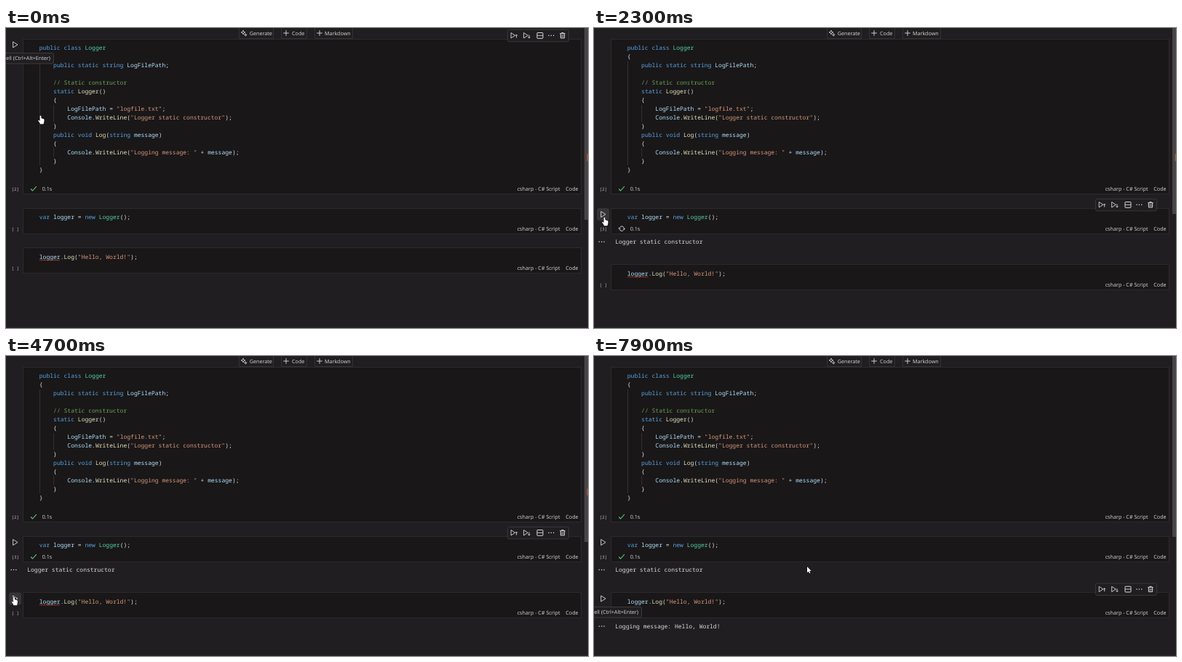
Recreate the animation shown at these times as an HTML page with a canvas. Size 800 px wide and 413 px high, loop 8 s.

```html
<!DOCTYPE html>
<html lang="en">
<head>
<meta charset="utf-8">
<title>Notebook run</title>
<style>
html, body { margin: 0; width: 100%; height: 100%; overflow: hidden; background: #201e20; }
canvas { display: block; width: 800px; height: 413px; }
</style>
</head>
<body>
<canvas id="stage"></canvas>
<script>
const W = 800, H = 413, LOOP = 8000, STEP = 100;
const CHAR = 4.82, LINE = 11.96, CODE_X = 45.8;
const MONO = '"Noto Sans Mono", "DejaVu Sans Mono", monospace';
const UI = '"Open Sans", "Noto Sans", sans-serif';
const COL = {
  page: '#201e20', cell: '#191718', edge: '#2c2a2c', text: '#dadada', dim: '#b4b4b4',
  key: '#5aa2e0', type: '#54d0a6', str: '#d8977c', note: '#6da058',
  name: '#b0e0fa', fn: '#e4e4bc', op: '#dedede', ok: '#5fc47e', err: '#c9483f'
};

const CLASS_CODE = [
  'public class Logger',
  '{',
  '    public static string LogFilePath;',
  '',
  '    // Static constructor',
  '    static Logger()',
  '    {',
  '        LogFilePath = "logfile.txt";',
  '        Console.WriteLine("Logger static constructor");',
  '    }',
  '    public void Log(string message)',
  '    {',
  '        Console.WriteLine("Logging message: " + message);',
  '    }',
  '}'
];

const canvas = document.getElementById('stage');
const dpr = window.devicePixelRatio || 1;
canvas.width = W * dpr;
canvas.height = H * dpr;
const ctx = canvas.getContext('2d');

function text(s, x, y, color = COL.text, size = 7.2, family = UI, align = 'left') {
  ctx.font = (family === MONO ? '500 ' : '') + size + 'px ' + family;
  ctx.textAlign = align;
  ctx.fillStyle = color;
  ctx.fillText(s, x, y);
}

function rect(x, y, w, h, fill, stroke, r = 0) {
  ctx.beginPath();
  ctx.roundRect(x, y, w, h, r);
  if (fill) { ctx.fillStyle = fill; ctx.fill(); }
  if (stroke) { ctx.strokeStyle = stroke; ctx.lineWidth = 1; ctx.stroke(); }
}

function line(points, color = COL.text, width = 0.9, close = false) {
  ctx.beginPath();
  points.forEach(([x, y], i) => i ? ctx.lineTo(x, y) : ctx.moveTo(x, y));
  if (close) ctx.closePath();
  ctx.strokeStyle = color;
  ctx.lineWidth = width;
  ctx.stroke();
}

function at(x, y, draw) {
  ctx.save();
  ctx.translate(x, y);
  draw();
  ctx.restore();
}

// Syntax colouring
const TOKEN = /(\/\/.*)|("[^"]*")|\b(public|class|static|string|void|var|new)\b|(\w+)(?=\()|(\w+)|([^\w\s"]+)/g;

function code(s, y) {
  let prev = '';
  for (const m of s.matchAll(TOKEN)) {
    const [word, note, str, key, fn, name] = m;
    let color = note ? COL.note : str ? COL.str : key ? COL.key : fn ? COL.fn : name ? COL.name : COL.op;
    if (prev === 'class' || prev === 'new') color = COL.type;
    text(word, CODE_X + m.index * CHAR, y, color, CHAR / 0.6, MONO);
    prev = word;
  }
}

// Icons
const play = (x, y, w = 6.4, h = 8) =>
  line([[x - w / 2, y - h / 2], [x + w / 2, y], [x - w / 2, y + h / 2]], COL.text, 0.9, true);

const check = (x, y) => line([[x - 3.8, y + 0.3], [x - 1.4, y + 2.8], [x + 3.8, y - 3]], COL.ok, 1.1);

const plus = (x, y) => {
  line([[x - 3.8, y], [x + 3.8, y]]);
  line([[x, y - 3.8], [x, y + 3.8]]);
};

function dots(x, y) {
  ctx.fillStyle = COL.text;
  for (const d of [-3.3, 0, 3.3]) ctx.fillRect(x + d - 0.6, y - 0.6, 1.3, 1.3);
}

function sparkle(x, y) {
  for (const [dx, dy, r] of [[-1, -1, 2.9], [2.3, 2.4, 1.8]]) at(x + dx, y + dy, () => {
    ctx.beginPath();
    for (let i = 0; i < 8; i++) {
      const a = i * Math.PI / 4, q = i % 2 ? r * 0.4 : r;
      ctx.lineTo(Math.cos(a) * q, Math.sin(a) * q);
    }
    ctx.closePath();
    ctx.strokeStyle = COL.text;
    ctx.lineWidth = 0.8;
    ctx.stroke();
  });
}

function spinner(x, y, angle) {
  at(x, y, () => {
    ctx.rotate(angle);
    for (let i = 0; i < 2; i++) {
      ctx.beginPath();
      ctx.arc(0, 0, 3.2, Math.PI, Math.PI * 1.87);
      ctx.strokeStyle = COL.text;
      ctx.lineWidth = 0.9;
      ctx.stroke();
      line([[1.3, -1.2], [3.3, -1.2], [3.3, -3.2]]);
      ctx.rotate(Math.PI);
    }
  });
}

function arrow(x, y, dir) {
  line([[x, y - 2.2], [x, y + 2.2]]);
  line([[x - 1.5, y + dir * 0.8], [x, y + dir * 2.3], [x + 1.5, y + dir * 0.8]]);
}

function trash(x, y) {
  line([[x - 3.7, y - 2.6], [x + 3.7, y - 2.6]], COL.text, 1);
  line([[x - 1.2, y - 2.8], [x - 1.2, y - 3.8], [x + 1.2, y - 3.8], [x + 1.2, y - 2.8]]);
  line([[x - 2.7, y - 2.6], [x - 2.6, y + 3.6], [x + 2.6, y + 3.6], [x + 2.7, y - 2.6]], COL.text, 1);
  for (const d of [-0.9, 0.9]) line([[x + d, y - 1], [x + d, y + 2.4]], COL.text, 0.8);
}

function toolbar(y) {
  rect(689.5, y - 8, 84, 16.5, COL.page, '#39373a', 2);
  play(697, y, 5.6, 7.4);
  arrow(701.6, y + 1, -1);
  play(714.5, y, 5.6, 7.4);
  arrow(719, y + 1.4, 1);
  rect(730, y - 3.8, 8, 7.8, null, COL.text, 0.6);
  line([[730, y], [738, y]]);
  dots(749.3, y);
  trash(765, y);
}

function insertButton(x, w, label, icon, labelX) {
  rect(x + 0.5, -2, w, 16.5, COL.page, '#333133');
  icon(x + 7, 7);
  text(label, labelX, 9.8);
}

function squiggle(x, y, w) {
  const points = [];
  for (let i = 0; i <= w; i += 1.4) points.push([x + i, y + (points.length % 2 ? -0.7 : 0.7)]);
  line(points, COL.err, 0.8);
}

function tooltip(y) {
  rect(-5, y + 11.5, 70.5, 14.5, COL.page, '#3d3b3d', 2);
  text('Execute Cell (Ctrl+Alt+Enter)', 60.9, y + 20.9, COL.text, 7.2, UI, 'right');
}

function cell(top, h, tag, state, spin) {
  rect(23.5, top + 0.5, 767, h, COL.cell, COL.edge);
  const base = top + h - 4;
  text(tag, 12.8, base, COL.dim, 5.9, MONO, 'center');
  text('csharp - C# Script', 702.7, base);
  text('Code', 769.3, base);
  if (!state) return;
  if (state === 'done') check(38, base - 2.8);
  else spinner(38.2, base - 2.8, spin);
  text(state === 'start' ? '0.0s' : '0.1s', 49.7, base);
}

function output(s, y) {
  dots(10.5, y);
  text(s, 29.2, y + 2.9, COL.text, CHAR / 0.6, MONO);
}

// Pointer: [time, x, y]
const PATH = [
  [0, 47.5, 121], [150, 47.5, 121], [1150, 14.4, 261], [3350, 14.4, 261], [3750, 36, 349.5],
  [3900, 36, 349.5], [4300, 11, 332], [7450, 11, 332], [7850, 293, 290], [8000, 293, 290]
];

function pointerAt(t) {
  const i = PATH.findIndex(p => p[0] > t);
  const [t0, x0, y0] = PATH[i - 1], [t1, x1, y1] = PATH[i];
  const k = (t - t0) / (t1 - t0), e = k * k * (3 - 2 * k);
  return [x0 + (x1 - x0) * e, y0 + (y1 - y0) * e];
}

function shape(points, x, y) {
  at(x, y, () => {
    line(points, '#111', 1.2, true);
    ctx.fillStyle = '#fff';
    ctx.fill();
  });
}

const ARROW = [[0, 0], [0, 8.2], [1.9, 6.5], [3.1, 9.2], [4.4, 8.6], [3.2, 6], [5.6, 5.8]];
const HAND = [[-0.9, -0.2], [0.8, -0.2], [1, 3.3], [4.4, 4.2], [5.1, 5.2], [4.8, 8.6], [4, 11.2],
  [-0.6, 11.2], [-1.2, 9.4], [-3.4, 6.6], [-2.5, 5.7], [-0.9, 6.9]];

const within = (t, a, b) => t >= a && t < b;

function draw(t) {
  ctx.setTransform(dpr, 0, 0, dpr, 0, 0);
  ctx.textRendering = 'geometricPrecision';
  ctx.lineJoin = 'round';
  rect(0, 0, W, H, COL.page);
  rect(0, 411.5, W, 1.5, '#292126');

  const [px, py] = pointerAt(t);
  const shown = t >= 2200;
  const printed = within(t, 5000, 6600) || t >= 6900;
  const broken = t < 5000;
  const selected = t < 2100 ? 0 : t < 4800 ? 1 : 2;
  const top3 = shown ? 325 : 302;
  const tops = [15, 248, top3];
  const ends = [228, shown ? 310 : 283, top3 + 54];
  const buttons = [23, 256.5, top3 + 9];

  // First cell
  cell(15, 213, '[2]', 'done');
  for (const [x, a, b] of [[46.5, 46, 189], [65.5, 106, 129.5], [65.5, 165, 177.5]])
    line([[x, a], [x, b]], '#323032', 1);
  CLASS_CODE.forEach((s, i) => code(s, 30.3 + i * LINE));

  // Second cell
  const state2 = t < 2100 ? '' : t < 2200 ? 'start' : t < 2500 ? 'run' : 'done';
  cell(248, 35, t < 2100 ? '[ ]' : '[3]', state2, (t - 2112) / 1500 * Math.PI * 2);
  code('var logger = new Logger();', 263.4);
  if (shown) output('Logger static constructor', 294.3);

  // Third cell
  let state3 = t < 4800 ? '' : t < 4900 ? 'start' : t < 5200 ? 'run' : 'done';
  if (within(t, 6600, 7000)) state3 = t < 6900 ? 'start' : 'run';
  cell(top3, 35, t < 4800 ? '[ ]' : '[4]', state3, (t - 6800) / 1500 * Math.PI * 2);
  code('logger.Log("Hello, World!");', top3 + 15.8);
  if (broken) squiggle(46, top3 + 17.6, 28.5);
  if (printed) output('Logging message: Hello, World!', 372);

  // Controls
  insertButton(320, 47, 'Generate', sparkle, 334.8);
  insertButton(378, 35, 'Code', plus, 393);
  insertButton(424, 52, 'Markdown', plus, 438);
  toolbar([10.3, 243.3, 321][selected]);

  let overButton = false;
  buttons.forEach((y, i) => {
    const over = Math.abs(px - 12.5) < 9 && Math.abs(py - y) < 9;
    const hovered = py >= tops[i] && py <= ends[i];
    if (over) {
      rect(4, y - 8.5, 17, 17, '#363436', null, 3);
      overButton = true;
    }
    if (over || hovered || selected === i) play(12.8, y);
  });

  // Scrollbar with problem mark
  rect(795, 0, 5, t < 2200 ? 264 : t < 5000 ? 256 : 249, '#474547');
  if (broken) rect(798.5, t < 2500 ? 173.5 : 182.5, 1.5, 9.5, '#a05a3c');

  if (t < 400) tooltip(23);
  if (within(t, 2900, 3500)) tooltip(256.5);
  if (within(t, 5800, 6300) || t >= 7300) tooltip(buttons[2]);

  shape(overButton || t < 200 ? HAND : ARROW, px, py);
}

function frame() {
  const t = performance.now() % LOOP;
  draw(Math.floor(t / STEP) * STEP);
  requestAnimationFrame(frame);
}
frame();
</script>
</body>
</html>
```
